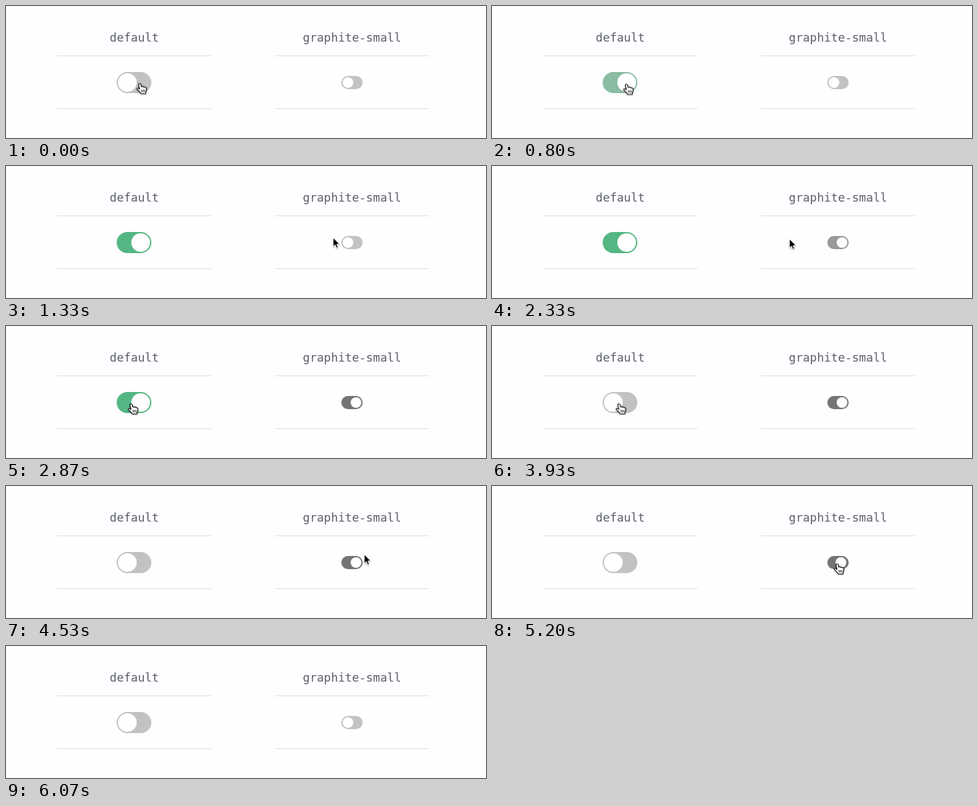
These frames come from a looping animation (720x200 px, 6540 ms). An HTML page:

```html
<!DOCTYPE html>
<html lang="en">
<head>
<meta charset="utf-8">
<title>Toggle switches</title>
<style>
  html, body { margin: 0; width: 100%; height: 100%; overflow: hidden; background: #fefdff; }
  svg { display: block; width: 720px; height: 200px; }
  text { font: 17.5px "DejaVu Sans Mono", monospace; fill: #5a606c; text-anchor: middle; }
  .rule { fill: #dddce0; }
  .track { fill: #c3c1c4; }
  .knob { fill: #fff; }

  .track, .knob, #cursor, #hand, #arrow { animation: 6540ms linear infinite; }
  .track, .knob { animation-timing-function: ease; }
  #hand, #arrow { animation-timing-function: step-end; }

  #large .knob { animation-name: large-knob; }
  #large .track { animation-name: large-track; }
  #small .knob { animation-name: small-knob; }
  #small .track { animation-name: small-track; }
  #cursor { animation-name: travel; }
  #hand { animation-name: hand; }
  #arrow { animation-name: arrow; }

  /* Each knob slides first; its track changes colour afterwards. */
  @keyframes large-knob {
    0%, 7.26%, 55.12%, 100% { transform: translateX(0); }
    11.09%, 51.3% { transform: translateX(20px); }
  }
  @keyframes large-track {
    0%, 11.09%, 58.94%, 100% { fill: #c3c1c4; }
    14.91%, 55.12% { fill: #54b783; }
  }
  @keyframes small-knob {
    0%, 30.66%, 82.87%, 100% { transform: translateX(0); }
    34.48%, 79.05% { transform: translateX(12px); }
  }
  @keyframes small-track {
    0%, 34.48%, 86.7%, 100% { fill: #c3c1c4; }
    38.3%, 82.87% { fill: #757376; }
  }

  @keyframes travel {
    0% { transform: translate(201px, 117.5px); animation-timing-function: step-end; }
    1.07% { transform: translate(202px, 118.5px); }
    13.76% { transform: translate(202px, 118.5px); animation-timing-function: ease-in-out; }
    20.34% { transform: translate(491px, 109px); animation-timing-function: ease-out; }
    24.46% { transform: translate(518px, 118px); }
    32.57% { transform: translate(518px, 118px); animation-timing-function: ease-in; }
    35.63% { transform: translate(448px, 111px); }
    37.77% { transform: translate(215px, 111px); animation-timing-function: ease-out; }
    41.28% { transform: translate(188px, 118px); }
    59.63% { transform: translate(188px, 118px); animation-timing-function: ease-in-out; }
    67.28% { transform: translate(550px, 100px); }
    68.35% { transform: translate(553px, 100px); }
    69.27% { transform: translate(538px, 104px); animation-timing-function: ease-out; }
    71.41%, 100% { transform: translate(518px, 118px); }
  }
  @keyframes hand {
    0%, 21.9%, 37.9%, 69.8% { opacity: 1; }
    14.8%, 34.1%, 61.2%, 84.1%, 100% { opacity: 0; }
  }
  @keyframes arrow {
    0%, 21.9%, 37.9%, 69.8%, 100% { opacity: 0; }
    14.8%, 34.1%, 61.2% { opacity: 1; }
  }
</style>
</head>
<body>
<svg viewBox="0 0 720 200">
  <defs>
    <filter id="shadow" x="-50%" y="-30%" width="200%" height="180%">
      <feDropShadow dx="0" dy="1" stdDeviation=".8" flood-opacity=".35"/>
    </filter>
  </defs>

  <text x="192.5" y="54">default</text>
  <text x="519" y="54">graphite-small</text>
  <g class="rule">
    <rect x="77" y="75" width="231" height="1"/>
    <rect x="77" y="155" width="231" height="1"/>
    <rect x="404" y="75" width="230" height="1"/>
    <rect x="404" y="155" width="230" height="1"/>
  </g>

  <g id="large">
    <rect class="track" x="166" y="100" width="52" height="32" rx="16"/>
    <circle class="knob" cx="182" cy="116" r="14"/>
  </g>
  <g id="small">
    <rect class="track" x="503" y="106" width="32" height="20" rx="10"/>
    <circle class="knob" cx="513" cy="116" r="8"/>
  </g>

  <!-- The pointing position is the origin of both cursor shapes. -->
  <g id="cursor">
    <g id="hand" filter="url(#shadow)" stroke="#000" stroke-linejoin="round">
      <path fill="#fff" stroke-width="1.1" d="M-2 1.5C-2.2-.4 .8-.6 1.3 1.2L2.3 5C3 4 5 4.1 5.2 5.4C6 4.5 7.5 4.8 7.8 6.1C8.8 5.5 9.8 6.3 9.8 7.5C10 10 9.1 11.5 8.7 13L8.5 15.3H1.4C.8 13-2.6 10.6-4.3 8.7C-5 7-3.1 6.2-1.8 7.4L-.5 8.5Z"/>
      <path fill="none" stroke-width=".9" d="M2.5 9.3l.2 3.6M4.7 9.2l.1 3.7M6.9 9.2v3.7"/>
    </g>
    <path id="arrow" filter="url(#shadow)" fill="#000" stroke="#fff" stroke-width="1"
      d="M-.5-.5V13.2L2.6 10.3L4.7 15.4L7.1 14.4L5 9.5H9.2Z"/>
  </g>
</svg>
</body>
</html>
```
